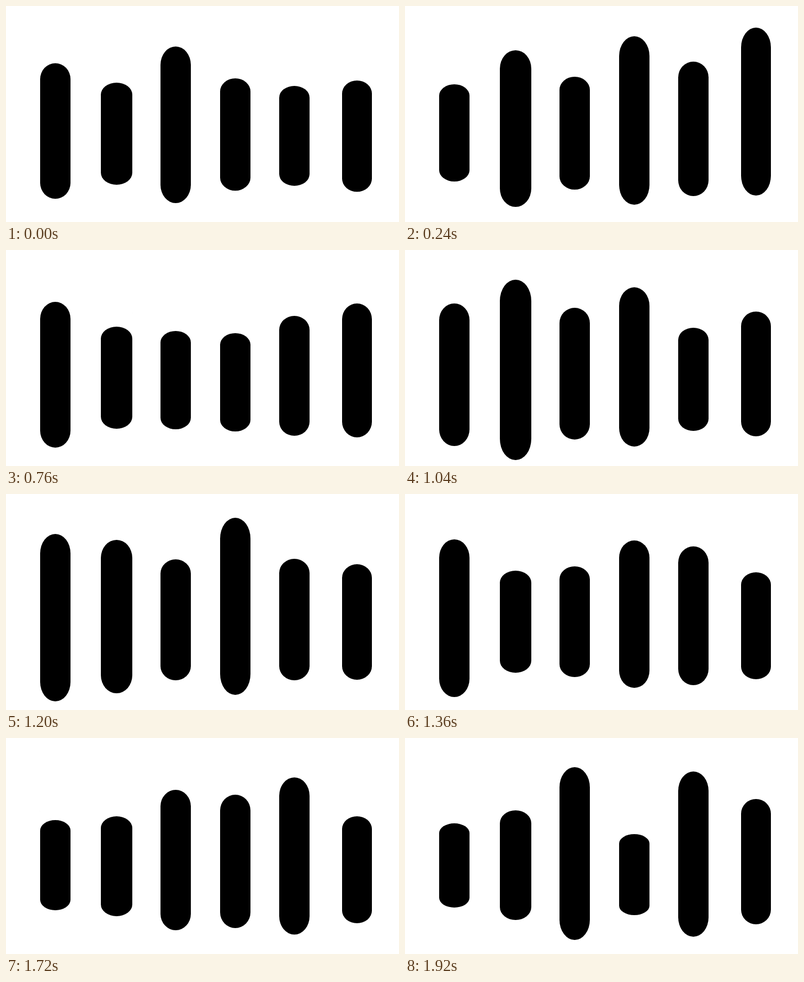
Recreate the animation shown at these times as an HTML page. Size 725x400 px, loop 1960 ms.

```html
<!DOCTYPE html>
<html lang="en">
<head>
<meta charset="utf-8">
<title>Sound bars</title>
<style>
  html, body { margin: 0; width: 100%; height: 100%; overflow: hidden; background: #fff; }
  i { position: absolute; background: #000; border-radius: 50% / 11.8%; }
</style>
</head>
<body>
<script>
const LOOP = 1960, STEP = 40;
const beats = [0, 440, 760, 1040, 1360, 1720, 1920];

// anchor: y the bar scales about; above: share of its height over that point;
// levels: height at each beat; turns: extra [time, height] points between beats
const bars = [
  { x: 62.8, w: 56.6, anchor: 243.2, above: 0.546,
    levels: [251.5, 251, 270.5, 263.5, 291.5, 167, 156],
    turns: [[220, 172], [620, 318], [900, 220], [1220, 315], [1820, 142]] },
  { x: 175.4, w: 57.6, anchor: 255.2, above: 0.598,
    levels: [188.5, 286.5, 189.5, 334, 189, 185, 203.5],
    turns: [[320, 323], [1080, 355], [1540, 250]] },
  { x: 284.5, w: 56.6, anchor: 275.9, above: 0.692,
    levels: [290, 141.5, 182, 243.5, 205.5, 260, 320],
    turns: [[1600, 206], [1880, 332]] },
  { x: 394.7, w: 56.4, anchor: 290.6, above: 0.751,
    levels: [208, 280.5, 182, 294.5, 273, 247.5, 150],
    turns: [[280, 330], [1160, 342], [1480, 231], [1640, 286]] },
  { x: 504.2, w: 56.3, anchor: 279.8, above: 0.7117,
    levels: [184.5, 186.5, 221.5, 191.5, 257.5, 290.5, 306],
    turns: [[220, 255], [1540, 325]] },
  { x: 620.3, w: 55.2, anchor: 328.7, above: 0.9277,
    levels: [206, 287, 247.5, 231.5, 197.5, 198.5, 232],
    turns: [[240, 311.5], [1540, 240]] }
];

for (const bar of bars) {
  bar.keys = beats.map((t, i) => [t, bar.levels[i]])
    .concat(bar.turns).sort((a, b) => a[0] - b[0]);
  bar.el = document.body.appendChild(document.createElement("i"));
  bar.el.style.left = bar.x + "px";
  bar.el.style.width = bar.w + "px";
}

function heightAt(keys, t) {
  const next = keys.findIndex(k => k[0] > t);
  if (next < 0) return keys[keys.length - 1][1];
  const [t0, h0] = keys[next - 1], [t1, h1] = keys[next];
  return h0 + (h1 - h0) * (t - t0) / (t1 - t0);
}

function draw() {
  const t = Math.floor(performance.now() % LOOP / STEP) * STEP;
  for (const { el, keys, anchor, above } of bars) {
    const h = heightAt(keys, t);
    el.style.top = anchor - above * h + "px";
    el.style.height = h + "px";
  }
  requestAnimationFrame(draw);
}
draw();
</script>
</body>
</html>
```
